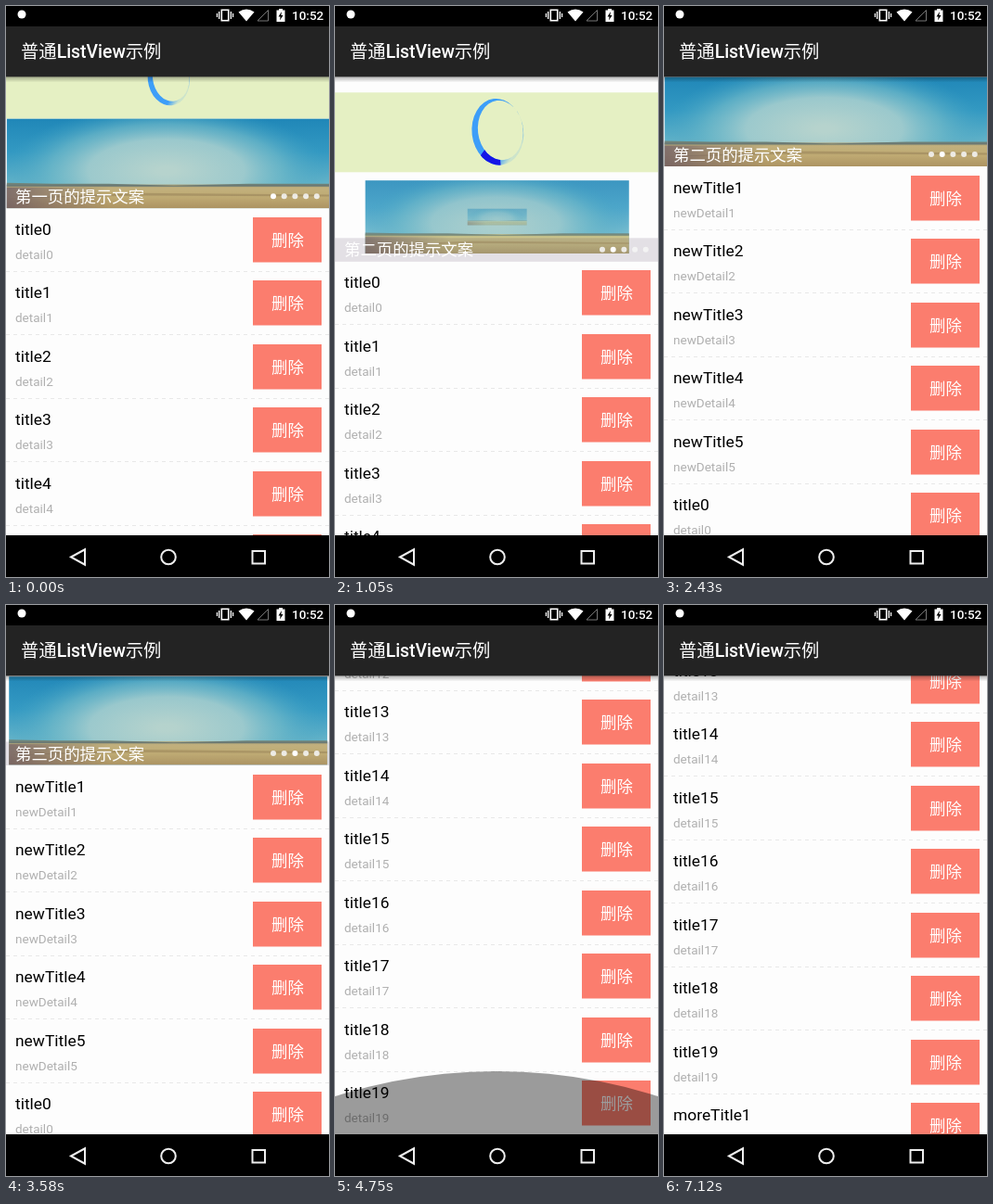
Recreate the animation shown at these times as an HTML page with a canvas. Size 348x616 px, loop 7.29 s.

```html
<!DOCTYPE html>
<html lang="zh">
<head>
<meta charset="utf-8">
<style>
html, body { margin: 0; width: 348px; height: 616px; overflow: hidden; background: #000; }
canvas { display: block; }
</style>
</head>
<body>
<canvas id="stage" width="348" height="616"></canvas>
<script>
const ctx = document.getElementById('stage').getContext('2d');
const LOOP = 7290, W = 348, TOP = 76.5, BOTTOM = 571;
const ROW = 68.5, BANNER = 96.5, HEADER = 86, TAU = Math.PI * 2;
const LATIN = 'Roboto, "Noto Sans CJK SC", "Noto Sans CJK", sans-serif';
const CJK = '"Noto Sans CJK SC", "Noto Sans CJK", sans-serif';

// Keyframes: [time, value]
const PULL = [[0, 45], [250, 84], [600, 107], [950, 110], [1050, 103], [1150, 86],
  [1600, 86], [1730, 48], [1800, 22], [1900, 0]];
const SCROLL = [[4260, 0], [4400, 260], [4660, 1313.5], [5040, 1313.5], [5200, 1335],
  [5450, 1351], [5720, 1358]];
const GLOW = [[4640, 0], [4740, 1], [4790, 1], [5010, 0]];
const PAGE_STARTS = [-1500, 476, 2440], PAGE_TIME = 2000;
const CAPTIONS = ['第一页的提示文案', '第二页的提示文案', '第三页的提示文案'];

const clamp = v => Math.max(0, Math.min(1, v));

function track(keys, t) {
  if (t <= keys[0][0]) return keys[0][1];
  for (let i = 1; i < keys.length; i++) {
    const [t0, a] = keys[i - 1], [t1, b] = keys[i];
    if (t < t1) return a + (b - a) * (t - t0) / (t1 - t0);
  }
  return keys[keys.length - 1][1];
}

function rect(x, y, w, h, fill) {
  ctx.fillStyle = fill;
  ctx.fillRect(x, y, w, h);
}

function dot(x, y, r, fill) {
  ctx.fillStyle = fill;
  ctx.beginPath();
  ctx.arc(x, y, r, 0, TAU);
  ctx.fill();
}

function poly(points, fill, stroke, width = 1) {
  ctx.beginPath();
  points.forEach(([x, y]) => ctx.lineTo(x, y));
  ctx.closePath();
  if (fill) { ctx.fillStyle = fill; ctx.fill(); }
  if (stroke) { ctx.strokeStyle = stroke; ctx.lineWidth = width; ctx.stroke(); }
}

function text(str, x, y, size, fill, family = LATIN, weight = 400) {
  ctx.font = `${weight} ${size}px ${family}`;
  ctx.fillStyle = fill;
  ctx.fillText(str, x, y);
  return x + ctx.measureText(str).width;
}

function gradient(g, ...stops) {
  stops.forEach(([at, color]) => g.addColorStop(at, color));
  return g;
}

function landscape() {
  rect(0, 0, W, BANNER, gradient(ctx.createLinearGradient(0, 0, 0, 72),
    [0, '#2087b8'], [.5, '#3399c2'], [1, '#66b4c8']));
  ctx.save();
  ctx.beginPath();
  ctx.rect(0, 0, W, 72);
  ctx.clip();
  ctx.translate(172, 56);
  ctx.scale(1, .4);
  rect(-172, -150, W, 200, gradient(ctx.createRadialGradient(0, 0, 10, 0, 0, 175),
    [0, 'rgba(182,211,205,1)'], [.45, 'rgba(160,203,205,.95)'],
    [.7, 'rgba(112,185,200,.7)'], [1, 'rgba(60,160,195,0)']));
  ctx.restore();
  rect(0, 71, W, BANNER - 71, gradient(ctx.createLinearGradient(0, 71, 0, BANNER),
    [0, '#b0aa76'], [.15, '#d6c583'], [.55, '#d2bd77'], [1, '#bda364']));
  poly([[0, 73], [0, 69], [50, 70], [110, 70], [180, 72], [260, 70], [W, 70], [W, 73]], '#71857a');
  poly([[0, 86], [140, 80], [W, 82], [W, 84], [150, 83]], 'rgba(160,138,84,.5)');
  rect(0, 74, 110, BANNER - 74, gradient(ctx.createLinearGradient(0, 0, 110, 0),
    [0, 'rgba(88,72,98,.6)'], [1, 'rgba(88,72,98,0)']));
}

function page(cy, scale) {
  if (scale < .03) return;
  ctx.save();
  ctx.globalAlpha = .3 + .7 * scale;
  ctx.translate(W / 2 + (scale < 1 ? .7 : 0), cy);
  ctx.scale(scale, scale);
  ctx.translate(-W / 2, -BANNER / 2);
  landscape();
  ctx.restore();
}

function banner(y, t) {
  const current = t < PAGE_STARTS[1] ? 0 : t < PAGE_STARTS[2] ? 1 : 2;
  const left = Math.pow(1 - clamp((t - PAGE_STARTS[current]) / PAGE_TIME), 5);
  const cy = y + BANNER / 2;
  page(cy, Math.max(left, 1 - left));
  page(cy, Math.min(left, 1 - left));
  rect(0, y + 71, W, BANNER - 71, 'rgba(70,50,85,.14)');
  text(CAPTIONS[current], 10, y + 90, 17.4, '#fff', CJK);
  for (let i = 0; i < 5; i++)
    dot(288 + 11.7 * i, y + 83.5, 3, i === current ? '#fff' : 'rgba(245,245,245,.88)');
}

function ringPath() {
  ctx.beginPath();
  ctx.ellipse(0, 0, 27.8, 36, -.12, 0, TAU);
  ctx.closePath();
  ctx.moveTo(27, 0);
  ctx.ellipse(3, -1.8, 24.3, 32.2, -.12, 0, TAU);
}

function refreshHeader(y, pull, t) {
  rect(0, y, W, HEADER, '#e5f0c3');
  ctx.save();
  ctx.translate(175.3, y + 42.5);
  const scale = t < 1600 ? Math.min(1, .55 + .5 * pull / HEADER) : 1;
  ctx.scale(scale, scale);
  ringPath();
  // The stroke fades out towards the lower right
  ctx.fillStyle = gradient(ctx.createLinearGradient(0, 0, 26, 20),
    [0, '#3d9ef8'], [.58, '#3d9ef8'], [.88, 'rgba(61,158,248,.15)']);
  ctx.fill('evenodd');
  if (t > 1000 && t < 1600) {
    ringPath();
    ctx.clip('evenodd');
    const a = 1.83 + (t - 1050) / 600 * TAU;
    ctx.beginPath();
    ctx.moveTo(0, 0);
    ctx.arc(0, 0, 50, a - .36, a + .36);
    ctx.fillStyle = '#1515e6';
    ctx.fill();
  }
  ctx.restore();
}

function row(name, detail, top) {
  const y = Math.floor(top);
  if (y > BOTTOM || y + ROW < TOP) return;
  text(name, 10, y + 29, 17.4, '#000');
  text(detail, 10, y + 55, 13.53, '#b0b0b0');
  rect(266, y + 10, 74, 48.5, '#fb7d6e');
  text('删除', 286, y + 41, 17.4, '#fff', CJK);
  ctx.save();
  ctx.setLineDash([4, 4]);
  ctx.strokeStyle = '#e8e8e8';
  ctx.lineWidth = 1;
  ctx.beginPath();
  ctx.moveTo(0, y + 68.5);
  ctx.lineTo(W, y + 68.5);
  ctx.stroke();
  ctx.restore();
}

function footer(y, t) {
  ctx.strokeStyle = '#999';
  ctx.lineWidth = 2;
  ctx.beginPath();
  const a = t / 700 * TAU;
  ctx.arc(147, y + 22, 6.5, a, a + 4.6);
  ctx.stroke();
  text('加载中…', 160, y + 26.5, 12.5, '#999', CJK);
}

function list(t) {
  const pull = track(PULL, t), y = TOP + pull - track(SCROLL, t);
  if (pull > 0) refreshHeader(y - HEADER, pull, t);
  if (y + BANNER > TOP) banner(y, t);
  const fresh = t < 1600 ? 0 : 5;
  const rowTop = i => y + BANNER + i * ROW;
  for (let i = 0; i < fresh + 20; i++) {
    const n = i - fresh;
    if (n < 0) row('newTitle' + (i + 1), 'newDetail' + (i + 1), rowTop(i));
    else row('title' + n, 'detail' + n, rowTop(i));
  }
  const end = rowTop(fresh + 20);
  if (t > 5000 && t < 6200) footer(end, t);
  if (t >= 6200) {
    ctx.globalAlpha = clamp((t - 6140) / 320);
    row('moreTitle1', 'moreDetail1', end);
    ctx.globalAlpha = 1;
  }
  const glow = track(GLOW, t);
  if (glow > 0) dot(W / 2, BOTTOM - 68 * glow + 574, 574, `rgba(0,0,0,${.39 * Math.sqrt(glow)})`);
}

function statusBar() {
  rect(0, 0, W, 22, '#000');
  dot(17, 9, 4.5, '#fff');
  ctx.strokeStyle = '#fff';
  ctx.lineWidth = 1.6;
  ctx.strokeRect(232.3, 4.3, 7.4, 11.4);
  for (const [x, y, h] of [[229, 6, 8], [241.7, 6, 8], [226.8, 8, 4], [243.9, 8, 4]])
    rect(x, y, 1.3, h, '#fff');
  ctx.fillStyle = '#fff';
  ctx.beginPath();
  ctx.moveTo(259, 16.5);
  ctx.lineTo(250.5, 6.5);
  ctx.quadraticCurveTo(259, .5, 267.5, 6.5);
  ctx.fill();
  poly([[282.5, 4.5], [282.5, 16], [271, 16]], null, '#777', 1);
  rect(291.5, 4.5, 9, 12.5, '#fff');
  rect(294, 3, 4, 2, '#fff');
  poly([[297, 6], [293.5, 11.5], [295.6, 11.5], [295, 15.5], [298.6, 10], [296.4, 10]], '#000');
  text('10:52', 308, 15.3, 13.5, '#fff', LATIN, 500);
}

function appBar() {
  rect(0, TOP, W, 6, gradient(ctx.createLinearGradient(0, TOP, 0, TOP + 6),
    [0, 'rgba(0,0,0,.28)'], [1, 'rgba(0,0,0,0)']));
  rect(0, 22, W, TOP - 22, '#232323');
  let x = text('普通', 16, 56, 19.35, '#fff', CJK);
  x = text('ListView', x, 56, 19.35, '#fff', LATIN, 500);
  text('示例', x, 56, 19.35, '#fff', CJK);
}

function navBar() {
  rect(0, BOTTOM, W, 616 - BOTTOM, '#000');
  poly([[70, 594.5], [85, 586.3], [85, 602.7]], null, '#eee', 2);
  ctx.beginPath();
  ctx.arc(175, 594.5, 7.8, 0, TAU);
  ctx.stroke();
  ctx.strokeRect(265.5, 588, 13.5, 13.5);
}

function draw(now) {
  const t = (now - start) % LOOP;
  rect(0, 0, W, 616, '#fdfdfd');
  list(t);
  appBar();
  statusBar();
  navBar();
  requestAnimationFrame(draw);
}

const start = performance.now();
requestAnimationFrame(() => draw(performance.now()));
</script>
</body>
</html>
```
